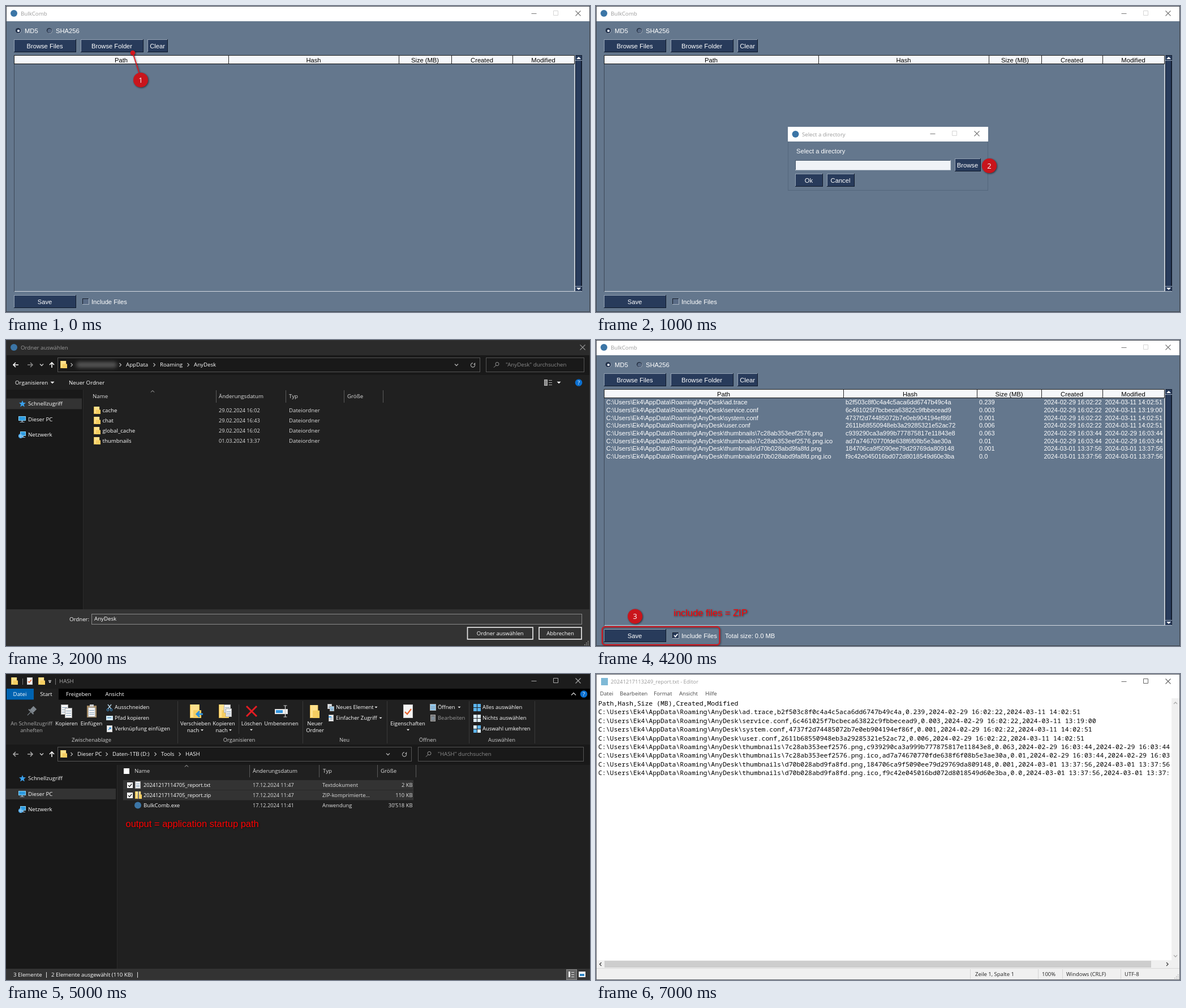
These frames come from a looping animation (1032x542 px, 8000 ms). An HTML page:

```html
<!DOCTYPE html>
<html lang="de">
<head>
<meta charset="utf-8">
<title>BulkComb</title>
<style>
  html, body { margin: 0; width: 100%; height: 100%; overflow: hidden; background: #202020; }
  svg { display: block; width: 1032px; height: 542px; }
  .ui { font-family: "Open Sans", "Noto Sans", sans-serif; }
  .tk { font-family: "Liberation Sans", Arial, sans-serif; }
  .mono { font-family: "Noto Sans Mono", "DejaVu Sans Mono", monospace; }
  .mid { text-anchor: middle; }
  .end { text-anchor: end; }
  .note { filter: drop-shadow(1px 1px 1.5px rgba(0, 0, 0, .6)); }
</style>
</head>
<body>
<svg id="stage" viewBox="0 0 1032 542" xmlns="http://www.w3.org/2000/svg"></svg>
<script>
const NAVY = '#283b5b', SLATE = '#64778d', RED = '#c9151c', INK = '#fff', SOFT = '#dedede', DIM = '#9a9a9a';
const APP = 'BulkComb';

// Drawing helpers; text is placed by the middle of its capitals.
const rect = (x, y, w, h, fill, more = '') =>
  `<rect x="${x}" y="${y}" width="${w}" height="${h}" fill="${fill}" ${more}/>`;
const box = (x, y, w, h, stroke, fill = 'none') =>
  rect(x + .5, y + .5, w - 1, h - 1, fill, `stroke="${stroke}"`);
const dot = (x, y, r, fill, more = '') => `<circle cx="${x}" cy="${y}" r="${r}" fill="${fill}" ${more}/>`;
const line = (d, stroke, width = 1) =>
  `<path d="${d}" fill="none" stroke="${stroke}" stroke-width="${width}"/>`;
const fillPath = (d, fill) => `<path d="${d}" fill="${fill}"/>`;
const text = (x, y, s, fill, size, cls) =>
  `<text x="${x}" y="${y + size * .36}" fill="${fill}" font-size="${size}" class="${cls}">${s}</text>`;
const ui = (x, y, s, fill = INK, size = 9.7, cls = '') => text(x, y, s, fill, size, 'ui ' + cls);
const tk = (x, y, s, fill = '#fff', size = 11.2, cls = '') => text(x, y, s, fill, size, 'tk ' + cls);

const vline = (x, y1, y2, c) => rect(x, y1, 1, y2 - y1, c);
const hline = (y, x1, x2, c) => rect(x1, y, x2 - x1, 1, c);
const right = (x, y, c = '#bbb') => line(`M${x - 1.5} ${y - 3}l3 3-3 3`, c, 1.1);
const down = (x, y, c = '#bbb') => line(`M${x - 3} ${y - 1.5}l3 3 3-3`, c, 1.4);
const up = (x, y, c = '#bbb') => line(`M${x - 3} ${y + 1.5}l3-3 3 3`, c, 1);
const drop = (x, y, c = INK, r = 2.5) => fillPath(`M${x - r} ${y - r / 2}h${2 * r}l${-r} ${r}z`, c);

function winButtons(x, y, c, gap = 39, maxColor = c) {
  return line(`M${x - 4.5} ${y + .5}h9`, c) +
    line(`M${x + gap - 4.5} ${y - 4.5}h8v8h-8z`, maxColor) + cross(x + 2 * gap, y, c);
}
const cross = (x, y, c) => line(`M${x - 4.5} ${y - 4.5}l9 9m0-9l-9 9`, c, 1.1);

// ---- Hash tool window ----
const dir = 'C:\\Users\\Ek4\\AppData\\Roaming\\AnyDesk\\';
const A = '2024-02-29 16:02:22', B = '2024-03-11 14:02:51', C = '2024-02-29 16:03:44', D = '2024-03-01 13:37:56';
const files = [
  ['ad.trace', 'b2f503c8f0c4a4c5aca6dd6747b49c4a', '0.239', A, B],
  ['service.conf', '6c461025f7bcbeca63822c9fbbecead9', '0.003', A, '2024-03-11 13:19:00'],
  ['system.conf', '4737f2d74485072b7e0eb904194ef86f', '0.001', A, B],
  ['user.conf', '2611b68550948eb3a29285321e52ac72', '0.006', A, B],
  ['thumbnails\\7c28ab353eef2576.png', 'c939290ca3a999b777875817e11843e8', '0.063', C, C],
  ['thumbnails\\7c28ab353eef2576.png.ico', 'ad7a74670770fde638f6f08b5e3ae30a', '0.01', C, C],
  ['thumbnails\\d70b028abd9fa8fd.png', '184706ca9f5090ee79d29769da809148', '0.001', D, D],
  ['thumbnails\\d70b028abd9fa8fd.png.ico', 'f9c42e045016bd072d8018549d60e3ba', '0.0', D, D]
].map(([name, ...rest]) => [dir + name, ...rest]);
const heads = ['Path', 'Hash', 'Size (MB)', 'Created', 'Modified'];

function button(x, y, w, label, h = 23) {
  return rect(x, y, w, h, '#101a2b') + rect(x, y, w - 1, h - 1, '#93a1b3') +
    rect(x + 1, y + 1, w - 2, h - 2, NAVY) + tk(x + w / 2 - .5, y + h / 2 + .3, label, '#fff', 11.2, 'mid');
}
function radio(x, y, on) {
  return dot(x, y, 5, '#a8b3c1') + dot(x - .4, y - .4, 4.7, '#1b2638') + dot(x, y, 3.8, on ? NAVY : '#596b85') +
    (on ? dot(x, y, 2.1, '#fff') : '');
}
function badge(x, y, n) {
  return `<g class="note">${dot(x, y, 13, RED)}</g>` + ui(x, y, n, '#fff', 13, 'mid');
}
function tool(cols, checked) {
  const edges = [14, ...cols, 787, 895, 1004];
  let s = rect(0, 0, 1032, 542, SLATE) + rect(0, 0, 1032, 27, '#fff') + box(0, 0, 1032, 542, '#3d434b') +
    dot(14, 13, 6, '#3b75a6') + ui(26, 13.5, APP, DIM) + winButtons(933, 13, '#777', 39, '#d5d5d5') +
    radio(22, 44, true) + tk(33, 44, 'MD5') + radio(77, 44, false) + tk(88, 44, 'SHA256') +
    button(14, 59, 110, 'Browse Files') + button(132, 59, 111, 'Browse Folder') + button(250, 59, 36, 'Clear') +
    hline(505, 14, 1005, '#d3d9e0') + vline(14, 87, 506, '#3c4757') + vline(1004, 87, 506, '#c4ccd6') +
    rect(14, 87, 991, 16, '#222') + hline(102, 14, 1005, '#111');
  heads.forEach((h, i) => {
    const x = edges[i], w = edges[i + 1] - x;
    s += rect(x + 1, 88, w - 1, 14, '#f5f7fa') + tk(x + w / 2, 95.5, h, '#000', 11.2, 'mid');
  });
  s += rect(1005, 87, 13, 419, '#b5bfca') + rect(1006, 87, 12, 418, '#131d2e') + rect(1007, 97, 9, 399, NAVY) +
    rect(1006, 88, 11, 8, NAVY) + rect(1006, 497, 11, 8, NAVY) +
    hline(96, 1006, 1018, '#9aa7b8') + hline(496, 1006, 1018, '#9aa7b8') +
    fillPath('M1008 94h8l-4-4z', '#fff') + fillPath('M1008 499h8l-4 4z', '#fff') +
    button(14, 512, 110, 'Save') + rect(135, 518, 12, 11, '#a8b3c1') + rect(135, 518, 11, 10, '#141c2a') +
    rect(136, 519, 10, 9, checked ? NAVY : '#596b85') + tk(151, 523.5, 'Include Files');
  return s + (checked ? line('M138 523l2.3 2.6 4-5', '#fff', 1.8) : '');
}

const start = () => tool([393, 694]) +
  `<g class="note">${line('M224 83L235.5 119', '#e0161e', 1.7)}${dot(224, 83, 4.3, '#d0151d')}</g>` + badge(238, 131, '1');

const picker = () => tool([393, 694]) +
  box(339, 214, 354, 113, '#53667d', SLATE) + rect(339, 214, 354, 26, '#fff') +
  dot(352.5, 227, 6, '#3b75a6') + ui(364, 227.5, 'Select a directory', DIM, 9.6) +
  winButtons(595, 226, '#777', 39, '#d5d5d5') + tk(354, 257, 'Select a directory') +
  rect(352, 273, 275, 18, '#c3ccd6') + rect(352, 273, 274, 17, '#46566a') + rect(353, 274, 273, 16, '#f0f3f7') +
  button(634, 270, 46, 'Browse') + button(352, 297, 49, 'Ok') + button(408, 297, 49, 'Cancel') + badge(695, 283, '2');

function results() {
  let s = tool([437, 673], true);
  files.forEach((row, i) => [18, 441, 677, 791.5, 899.5].forEach((x, k) => {
    s += tk(x, 110.3 + i * 13.7, row[k], '#fff', k ? 11 : 11.1);
  }));
  return s + tk(228, 523.5, 'Total size: 0.0 MB') +
    `<g class="note">${rect(11, 508, 207.5, 32, 'none', 'rx="5" stroke="#d9151d" stroke-width="2"')}` +
    tk(137, 483.5, 'include files = ZIP', '#f00', 16.5) + '</g>' + badge(69, 489.5, '3');
}

// ---- Dark file windows ----
const folder = (x, y, w = 12, h = 13) => rect(x, y, w * .85, h, '#e3b341') + rect(x + 1, y, w * .75, h - 1, '#ffe18c') +
  rect(x + w * .3, y + h * .42, w * .7, h * .58, '#f6ce62');
const star = (x, y) => fillPath(`M${x} ${y - 6}l1.6 4 4.4.3-3.4 2.7 1.2 4.4-3.8-2.5-3.8 2.5 1.2-4.4-3.4-2.7 4.4-.3z`, '#3aa0ec');
const screen = (x, y, w = 13) => rect(x, y, w, 8, '#8cd3f7') + rect(x + 1, y + 1, w - 2, 6, '#2d9be0') +
  rect(x + w / 2 - 1, y + 8, 2, 2, '#9ab') + rect(x + w / 2 - 4, y + 10, 8, 1, '#9ab');
const net = (x, y) => screen(x + 3, y - 6, 10) + dot(x + 4, y + 2, 4, '#4aa7e8') + line(`M${x} ${y + 2}h8m-4-4v8`, '#b9e2fa', .8);
const help = (x, y) => dot(x, y, 6.3, '#0a6fd0') + ui(x, y, '?', '#fff', 9.5, 'mid');
const page = (x, y, w, h, c = '#f3f3f3') => box(x, y, w, h, '#aaa', c) +
  [.3, .5, .7].map(k => hline(y + Math.round(h * k), x + 2, x + w - 2, '#8aa5bd')).join('');
const reload = (x, y) => line(`M${x + 3.2} ${y - 1.6}a3.6 3.6 0 1 1-3.2-2`, '#aaa', 1.1) +
  fillPath(`M${x + 4.2} ${y - 4.5}v3.6h-3.6z`, '#aaa');

function sidebar(y, w, active) {
  return rect(0, y + active * 27.5 - 9.5, w, 19, '#333') + star(29, y) + ui(39, y, 'Schnellzugriff') +
    screen(22, y + 22) + ui(39, y + 27.5, 'Dieser PC') + net(22, y + 55) + ui(39, y + 55, 'Netzwerk');
}
function address(y, addressEnd, searchX, searchEnd, label, parts, nextColor) {
  let s = line(`M22 ${y}h-9m4-4l-4 4 4 4`, nextColor ? '#aaa' : '#fff', 1.6) +
    line(`M38 ${y}h9m-4-4l4 4-4 4`, nextColor || '#888', 1.5) + down(63, y, '#ccc') +
    line(`M81 ${y + 5}v-9m-4 4l4-4 4 4`, '#fff', 1.6) +
    box(91, y - 13, addressEnd - 91, 26, '#555') + folder(96, y - 7) + right(116, y) +
    box(searchX, y - 13, searchEnd - searchX, 26, '#555') + dot(searchX + 20, y - 1.5, 3, 'none', 'stroke="#999"') +
    line(`M${searchX + 18} ${y + .7}l-4 4`, '#999') + ui(searchX + 35, y, label, '#8a8a8a') +
    down(addressEnd - 42, y, '#aaa') + reload(addressEnd - 13, y + .5);
  parts.forEach(([x, name, arrow]) => { s += ui(x, y, name) + (arrow ? right(arrow, y) : ''); });
  return s;
}
const columns = (y, names, seps) => names.map(([x, n]) => ui(x, y, n, SOFT)).join('') +
  seps.map(x => vline(x, y - 11, y + 11, '#5a5a5a')).join('');

function chooseFolder() {
  let s = rect(0, 0, 1032, 542, '#202020') + rect(0, 0, 1032, 27, '#2b2b2b') + rect(0, 27, 1032, 35, '#191919') +
    rect(0, 88, 136, 389, '#191919') + vline(136, 88, 477, '#2b2b2b') + rect(0, 477, 1032, 65, '#333') +
    dot(14, 13, 6, '#3b75a6') + ui(26, 13.5, 'Ordner auswählen', DIM) + cross(1019, 13, '#999') +
    address(44, 838, 848, 1022, '"AnyDesk" durchsuchen',
      [[212, 'AppData', 262], [272, 'Roaming', 322], [332, 'AnyDesk']]) +
    '<filter id="blur" x="-20%" y="-60%" width="140%" height="220%"><feGaussianBlur stdDeviation="3"/></filter>' +
    rect(124, 39, 72, 10, '#555', 'rx="5" filter="url(#blur)"') + right(202, 44) +
    ui(16, 75.5, 'Organisieren') + drop(82, 75.5, INK, 3.5) + ui(111, 75.5, 'Neuer Ordner') +
    box(951, 70, 6, 11, '#bbb', '#888') + [71, 75, 79].map(y => hline(y, 959, 965, '#aaa')).join('') +
    drop(977, 75.5, INK, 3.5) + help(1012, 75.5) + sidebar(113, 134, 0) +
    columns(100, [[153, 'Name'], [376, 'Änderungsdatum'], [500, 'Typ'], [603, 'Größe']], [371, 494, 597, 666]) + up(259, 91);
  [['cache', '29.02.2024 16:02'], ['chat', '29.02.2024 16:43'], ['global_cache', '29.02.2024 16:02'], ['thumbnails', '01.03.2024 13:37']]
    .forEach(([name, date], i) => {
      const y = 125 + i * 18;
      s += folder(155, y - 7) + ui(170.5, y, name) + ui(376, y, date, SOFT, 9.2) + ui(500, y, 'Dateiordner', SOFT);
    });
  const dialogButton = (x, w, label) => rect(x, 509, w, 21, '#333', 'stroke="#e6e6e6" stroke-width="1.7"') +
    ui(x + w / 2, 519.5, label, '#fff', 9.6, 'mid');
  s += ui(112, 494.5, 'Ordner:') + box(151, 485, 867, 19, '#8a8a8a', '#383838') + ui(156, 494, 'AnyDesk') +
    dialogButton(815.5, 115.5, 'Ordner auswählen') + dialogButton(942, 75, 'Abbrechen');
  for (let i = 0; i < 3; i++) for (let k = 0; k <= i; k++) s += rect(1028 - k * 3, 533 + i * 3, 1.5, 1.5, '#aaa');
  return s + box(0, 0, 1032, 542, '#303030');
}

function ribbon() {
  const size = 9.45;
  const big = (x, a, b = '') => ui(x, 88, a, INK, size, 'mid') + ui(x, 99.5, b, INK, size, 'mid');
  const small = (x, row, s, c) => ui(x, 59 + row * 19, s, c, size);
  const group = (x, s) => ui(x, 116.5, s, '#ccc', size, 'mid');
  const grid = (y, colors) => colors.map((c, i) => rect(826 + i % 2 * 7, y - 6 + (i >> 1) * 7, 6, 6, c)).join('');
  const sky = '#5bb4ee', pale = '#dcecf6';
  return [303, 524, 673, 818, 934].map(x => vline(x, 48, 123, '#3a3a3a')).join('') + vline(411, 54, 106, '#3a3a3a') +
    `<g transform="rotate(45 45 66)">${rect(41, 57, 8, 9, '#7e868d')}${rect(39, 66, 12, 2, '#7e868d')}${rect(44.4, 68, 1.2, 8, '#7e868d')}</g>` +
    ui(45, 88, 'An Schnellzugriff', '#aaa', size, 'mid') + ui(45, 99.5, 'anheften', '#aaa', size, 'mid') +
    page(97, 54, 13, 18) + page(104, 60, 13, 18) + big(107, 'Kopieren') +
    rect(143, 56, 17, 21, '#a58a62') + page(145, 59, 13, 17) + rect(148, 54, 7, 4, '#ccc') + big(151, 'Einfügen') +
    line('M180 54l6 8m0-8l-6 8', '#b8d5e8', 1.3) + dot(180, 63.5, 1.9, 'none', 'stroke="#3d9be0"') + dot(186, 63.5, 1.9, 'none', 'stroke="#3d9be0"') +
    rect(177, 74, 12, 8, '#cfe6f5') + hline(77, 179, 186, '#2875ad') +
    box(178, 91, 10, 12, '#ccc', '#eee') + line('M181 99l4-4m-3 0h3v3', '#2587d1', 1.2) +
    small(192, 0, 'Ausschneiden') + small(192, 1, 'Pfad kopieren') + small(192, 2, 'Verknüpfung einfügen') + group(151, 'Zwischenablage') +
    folder(325, 54, 20, 24) + line('M348 71h-11m5-5l-5 5 5 5', '#2b91df', 3) + big(335, 'Verschieben') + ui(320, 99.5, 'nach', INK, size) + drop(346.5, 99.5) +
    folder(376, 54, 18, 24) + page(385, 54, 12, 15) + page(388, 61, 11, 15) + big(385, 'Kopieren') + ui(370.5, 99.5, 'nach', INK, size) + drop(396.5, 99.5) +
    line('M425 57l18 18m0-18l-18 18', '#e51c23', 3) + big(434, 'Löschen') + drop(433.5, 99) +
    box(475, 62, 23, 9, '#ddd', '#eee') + rect(477, 64, 12, 5, '#3294dc') + line('M490.5 56h6m-3 0v20m-3 0h6', '#ccc', 1.2) +
    big(486.5, 'Umbenennen') + group(412, 'Organisieren') +
    folder(537, 55, 17, 23) + big(546, 'Neuer', 'Ordner') +
    page(568, 53, 8, 9) + page(572, 57, 8, 9, '#9ed2f2') + small(583, 0, 'Neues Element') + drop(654, 59) +
    page(570, 72, 9, 12) + line('M570 76h5', '#2b91df', 2) + small(583, 1, 'Einfacher Zugriff') + drop(662, 78) + group(598, 'Neu') +
    box(702, 54, 17, 24, '#ccc', '#f4f4f4') + line('M705 67l4 4 7-9', '#e5622d', 2.2) + big(710, 'Eigenschaften') + drop(710.5, 99) +
    page(749, 53, 11, 12, '#8fc9ef') + small(763, 0, 'Öffnen') + drop(801, 59) +
    page(750, 72, 9, 12, '#777') + small(763, 1, 'Bearbeiten', '#999') + group(745, 'Öffnen') +
    grid(59, [sky, sky, sky, sky]) + grid(78, [pale, pale, pale, pale]) + grid(97, [pale, sky, sky, pale]) +
    small(842, 0, 'Alles auswählen') + small(842, 1, 'Nichts auswählen') + small(842, 2, 'Auswahl umkehren') + group(876, 'Auswählen');
}

function explorer() {
  const check = (x, y) => rect(x, y - 5, 10, 10, '#fff') + line(`M${x + 2} ${y}l2.3 2.5 4-5`, '#222', 1.3);
  let s = rect(0, 0, 1032, 542, '#202020') + rect(0, 0, 1032, 26, '#1c1c1c') + rect(0, 26, 1032, 19.5, '#000') +
    rect(1, 26, 48, 19.5, '#0063b1') + rect(49, 26, 44, 20, '#202020') + rect(0, 125, 1032, 36, '#191919') +
    rect(0, 161, 196, 361, '#191919') + vline(196, 161, 522, '#2b2b2b') + rect(0, 522, 1032, 20, '#333') +
    folder(9, 6) + vline(29, 8, 19, '#777') + box(37, 6, 10, 13, '#ccc', '#f4f4f4') + line('M39 13l2 2 4-5', '#e5622d', 1.3) +
    folder(57, 6) + hline(11, 75, 80, INK) + drop(77.5, 14.5) + vline(87, 8, 19, '#777') + ui(94, 13, 'HASH', '#aaa') +
    winButtons(933, 12, '#aaa') +
    ui(24.5, 36, 'Datei', '#fff', 9.7, 'mid') + ui(71, 36, 'Start', '#fff', 9.7, 'mid') +
    ui(106, 36, 'Freigeben') + ui(175.5, 36, 'Ansicht') + line('M999 37.5l4-4 4 4', '#ccc', 1.3) + help(1021, 35.5) + ribbon() +
    address(142, 717, 728, 1021, '"HASH" durchsuchen',
      [[126, 'Dieser PC', 178], [188, 'Daten-1TB (D:)', 264], [274, 'Tools', 307], [317, 'HASH']], '#aaa') +
    sidebar(185, 194, 1) + rect(208, 167, 10, 10, '#fff') + up(319, 163) +
    columns(172, [[227, 'Name'], [436, 'Änderungsdatum'], [560, 'Typ'], [662, 'Größe']], [430, 553, 656, 724]);
  [['20241217114705_report.txt', '11:47', 'Textdokument', '2 KB'],
   ['20241217114705_report.zip', '11:47', 'ZIP-komprimierte...', '110 KB'],
   [APP + '.exe', '11:41', 'Anwendung', '30\u2019518 KB']].forEach(([name, time, type, size], i) => {
    const y = 197 + i * 18;
    if (i < 2) s += rect(207, y - 9, 513, 17.5, '#333') + check(214, y);
    s += ui(243, y, name, INK, i < 2 ? 9.2 : 9.6) + ui(436, y, '17.12.2024 ' + time, SOFT, 9.2) +
      ui(559, y, type, SOFT, 9.4) + ui(718.5, y, size, SOFT, 9.4, 'end');
  });
  return s + page(228, 190, 10, 13) + folder(228, 208) + rect(233, 208, 2, 13, '#777') + dot(233, 232.5, 6, '#3b75a6') +
    `<g class="note">${tk(211.5, 265, 'output = application startup path', '#f00', 16.5)}</g>` +
    ui(13, 532.5, '3 Elemente') + vline(71, 528, 538, SOFT) + ui(80, 532.5, '2 Elemente ausgewählt (110 KB)') + vline(232, 528, 538, SOFT) +
    box(990, 523, 19, 19, '#888', '#666') + rect(994, 527, 3, 10, '#eee') + [528, 532, 536].map(y => hline(y, 999, 1004, SOFT)).join('') +
    box(1012, 527, 12, 10, '#eee', '#fff') + rect(1014, 531, 8, 4, '#2d84c4');
}

// ---- Text editor ----
function editor() {
  const lines = [heads.join(), ...files.map(f => f.join())];
  let s = rect(0, 0, 1032, 542, '#fff') + rect(9, 7, 12, 13, '#7fb9d6') +
    ui(26, 13.5, '20241217113249_report.txt - Editor', DIM, 9.38) + winButtons(933, 13, '#666') +
    [[7, 'Datei'], [42, 'Bearbeiten'], [102, 'Format'], [147, 'Ansicht'], [193, 'Hilfe']]
      .map(([x, m]) => ui(x, 35, m, '#444', 9.6)).join('') +
    '<clipPath id="sheet"><path d="M0 43h1014v464H0z"/></clipPath><g clip-path="url(#sheet)">' +
    lines.map((l, i) => text(4, 51.5 + i * 15.47, l, '#000', 11.465, 'mono')).join('') + '</g>' +
    rect(1017, 43, 14, 464, '#f0f0f0') + line('M1021 53l3-3 3 3', '#aaa', 1.3) + line('M1021 498l3 3 3-3', '#aaa', 1.3) +
    rect(1, 507, 1030, 14, '#f0f0f0') + rect(15, 508, 966, 12, '#cdcdcd') +
    line('M9.5 511l-3 3 3 3', '#444', 1.4) + line('M1008 511l3 3-3 3', '#444', 1.4) +
    rect(1, 521, 1030, 20, '#f0f0f0') + hline(521, 1, 1031, '#d9d9d9');
  [[661, 670, 'Zeile 1, Spalte 1'], [781, 788, '100%'], [824, 831, 'Windows (CRLF)'], [927, 934, 'UTF-8']]
    .forEach(([x, tx, label]) => { s += vline(x, 523, 540, '#d5d5d5') + ui(tx, 532, label, '#222', 9.5); });
  for (let i = 0; i < 3; i++) for (let k = 0; k <= i; k++) s += rect(1028 - k * 3, 532 + i * 3, 1.5, 1.5, '#b5b5b5');
  return s + box(0, 0, 1032, 542, '#5b5f66');
}

// ---- Timeline: scene and its end in ms ----
const steps = [[start, 1000], [picker, 2000], [chooseFolder, 3000], [results, 5000], [explorer, 7000], [editor, 8000]];
const stage = document.getElementById('stage');
stage.innerHTML = steps.map(([draw]) => `<g display="none">${draw()}</g>`).join('');
const scenes = [...stage.children];
let shown = -1;

function tick() {
  const t = performance.now() % 8000;
  const now = steps.findIndex(([, end]) => t < end);
  if (now !== shown) {
    scenes.forEach((g, i) => g.setAttribute('display', i === now ? 'inline' : 'none'));
    shown = now;
  }
  requestAnimationFrame(tick);
}
tick();
</script>
</body>
</html>
```
